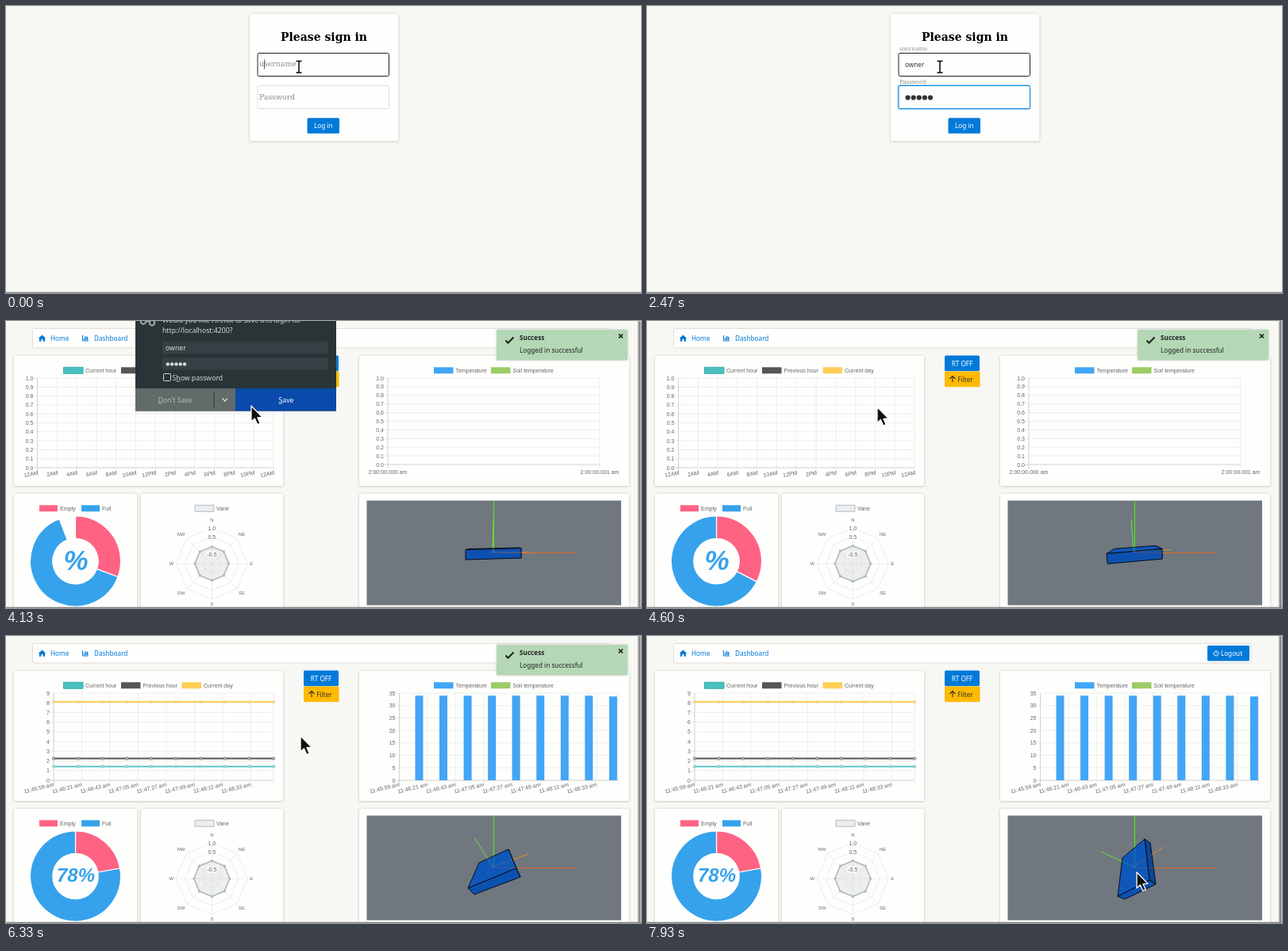
An HTML page with a canvas for the animation above (8000 ms loop, 800 by 362 pixels).

```html
<!DOCTYPE html>
<html lang="en">
<head>
<meta charset="utf-8">
<title>Sensor dashboard</title>
<style>
  html, body { margin: 0; width: 100%; height: 100%; overflow: hidden; background: #f7f7f4; }
  canvas { display: block; }
</style>
</head>
<body>
<canvas id="stage" width="800" height="362"></canvas>
<script>
const LOOP = 8000;
const SANS = '"Noto Sans", "Open Sans", sans-serif';
const SERIF = '"DejaVu Serif", serif';
const ARIAL = '"Liberation Sans", Arial, sans-serif';
const BLUE = '#007ad9', INK = '#333', CHART_BLUE = '#36a2eb', PINK = '#ff6384';
const USER = 'owner';
const ctx = document.getElementById('stage').getContext('2d');

const clamp = v => Math.max(0, Math.min(1, v));
const mix = (a, b, p) => a + (b - a) * p;
const progress = (t, from, to) => clamp((t - from) / (to - from));
const easeOut = p => 1 - (1 - p) ** 4;
const smooth = p => p * p * (3 - 2 * p);

// Interpolates between [time, ...values] keys.
function track(keys, t, ease = p => p) {
  let i = 0;
  while (i < keys.length - 2 && t > keys[i + 1][0]) i++;
  const [a, b] = [keys[i], keys[i + 1]];
  const p = ease(progress(t, a[0], b[0]));
  return a.slice(1).map((v, k) => mix(v, b[k + 1], p));
}

function rect(x, y, w, h, fill, stroke, r = 0) {
  ctx.beginPath();
  ctx.roundRect(x, y, w, h, r);
  if (fill) { ctx.fillStyle = fill; ctx.fill(); }
  if (stroke) { ctx.strokeStyle = stroke; ctx.lineWidth = 1; ctx.stroke(); }
}

function line(x1, y1, x2, y2, color, width = 1) {
  ctx.beginPath();
  ctx.moveTo(x1, y1);
  ctx.lineTo(x2, y2);
  ctx.strokeStyle = color;
  ctx.lineWidth = width;
  ctx.stroke();
}

function poly(points, fill, stroke, width = 1, closed = true) {
  ctx.beginPath();
  points.forEach(([x, y]) => ctx.lineTo(x, y));
  if (closed) ctx.closePath();
  if (fill) { ctx.fillStyle = fill; ctx.fill(); }
  if (stroke) { ctx.strokeStyle = stroke; ctx.lineWidth = width; ctx.stroke(); }
}

function dot(x, y, r, fill) {
  ctx.beginPath();
  ctx.arc(x, y, r, 0, Math.PI * 2);
  ctx.fillStyle = fill;
  ctx.fill();
}

// cy is the middle of the capital letters.
function text(str, x, cy, size, color, font = SANS, align = 'left', style = '') {
  ctx.font = `${style} ${size}px ${font}`;
  ctx.textAlign = align;
  ctx.fillStyle = color;
  ctx.fillText(str, x, cy + size * 0.36);
  return ctx.measureText(str).width;
}

const label = (str, x, cy, align) => text(str, x, cy, 7.02, '#666', ARIAL, align);

function tiltedLabel(str, x, y, angle) {
  ctx.save();
  ctx.translate(x, y);
  ctx.rotate(angle);
  label(str, 0, 0, 'right');
  ctx.restore();
}

function card(x, y, w, h) {
  ctx.save();
  ctx.shadowColor = 'rgba(0,0,0,.25)';
  ctx.shadowBlur = 3;
  ctx.shadowOffsetY = 0.6;
  rect(x, y, w, h, '#fefefd', null, 2);
  ctx.restore();
}

function button(x, y, w, h, str, fill = BLUE, color = '#fff', textX = x + w / 2) {
  rect(x, y, w, h, fill, null, 1.5);
  text(str, textX, y + h / 2 + 0.2, 8.2, color, SANS, 'center');
}

/* ---------- sign-in page ---------- */

function field(y, focus, idle) {
  if (focus > 0) {
    ctx.save();
    ctx.globalAlpha = focus;
    rect(315.5, y - 1.5, 168, 32, '#a6d5fa', null, 3);
    ctx.restore();
  }
  rect(317, y, 165.5, 29, '#fefefd', focus > 0.4 ? '#0a84d8' : idle, 2);
}

function floatingLabel(str, y, p) {
  const q = smooth(p);
  text(str, mix(319, 318, q), mix(y + 13.4, y - 5.6, q), mix(9.36, 7.02, q), '#8b8b88', SERIF);
}

function caret(x, y) {
  line(x + 0.5, y + 8, x + 0.5, y + 20, '#333', 0.8);
}

function drawLogin(t) {
  const userFocus = Math.min(progress(t, 40, 300), 1 - progress(t, 1730, 1930));
  const passFocus = Math.min(progress(t, 1730, 1930), 1 - progress(t, 2460, 2660));
  const typed = [1130, 1200, 1300, 1470, 1535].filter(k => t >= k).length;
  const dots = [1990, 2060, 2130, 2200, 2260].filter(k => t >= k).length;

  card(307, 10, 187.5, 160.5);
  text('Please sign in', 400.5, 39, 14, '#000', SERIF, 'center', 'bold');

  field(59.5, userFocus, '#222');
  floatingLabel('username', 59.3, progress(t, 40, 310));
  const width = text(USER.slice(0, typed), 325, 74, 8.2, INK);
  if (t < 1730) caret(325 + width, 59.5);

  field(100.5, passFocus, '#dededc');
  floatingLabel('Password', 100.8, progress(t, 1730, 1960));
  for (let i = 0; i < dots; i++) dot(328.6 + i * 7.1, 115.5, 3.1, INK);
  if (t >= 1730 && t < 2460) caret(325 + dots * 7.1, 100.5);

  const ring = progress(t, 2460, 2700);
  if (ring) {
    ctx.globalAlpha = ring;
    rect(377.5, 139.5, 44, 23, '#8dcdff', null, 2.5);
    ctx.globalAlpha = 1;
  }
  button(379.5, 141.2, 40.5, 19.6, 'Log in');
}

/* ---------- password prompt ---------- */

function mnemonic(str, x, cy, color, index) {
  text(str, x, cy, 8.7, color);
  const before = ctx.measureText(str.slice(0, index)).width;
  const letter = ctx.measureText(str[index]).width;
  line(x + before, cy + 4.6, x + before + letter, cy + 4.6, color, 0.7);
}

function drawPrompt(t) {
  const light = '#d5dadb';
  rect(163, -5, 253, 118.5, '#293437');
  ctx.strokeStyle = '#a4abad';
  ctx.lineWidth = 2;
  ctx.beginPath();
  ctx.arc(173, 0.5, 3.2, 0, Math.PI * 2);
  ctx.moveTo(176, 0.5);
  ctx.lineTo(181, 0.5);
  ctx.stroke();
  ctx.beginPath();
  ctx.arc(184, 2.3, 3.2, 0, Math.PI * 2);
  ctx.stroke();
  text('Would you like Firefox to save this login for', 197, -1, 8.7, light);
  text('http://localhost:4200?', 197, 11.5, 8.7, light);
  rect(197, 26, 209, 15.5, '#353f44');
  rect(197, 46, 209, 15.5, '#353f44');
  text(USER, 201, 34, 8.7, light);
  for (let i = 0; i < 5; i++) dot(203.8 + i * 5.3, 54.4, 2.2, light);
  rect(198.5, 66.5, 9, 9, null, light, 1);
  mnemonic('Show password', 209.5, 71.5, light, 1);

  rect(163, 85, 126, 28.5, '#636a6a');
  rect(289, 85, 127, 28.5, t < 3850 ? '#0060df' : '#0a4aaa');
  line(262, 90, 262, 109, '#2d3638');
  mnemonic("Don't Save", 191.5, 99.5, '#b7bcbc', 0);
  mnemonic('Save', 343.5, 99.5, '#fff', 0);
  poly([[272.5, 97.5], [275.8, 101], [279, 97.5]], null, '#d5dadb', 1.2, false);
}

/* ---------- dashboard ---------- */

function legend(x, cy, str, fill, stroke, width = 24.5) {
  rect(x, cy - 4, width, 8, fill, stroke);
  label(str, x + width + 3, cy);
}

function yAxis(x, right, top, bottom, names) {
  names.forEach((name, i) => {
    const y = mix(bottom, top, i / (names.length - 1));
    line(x - 5, y, right, y, i ? '#e7e7e6' : '#bdbdbd', 0.7);
    label(name, x - 5, y, 'right');
  });
}

function xGrid(x, top, bottom, first) {
  line(x, top, x, bottom + 5, first ? '#bdbdbd' : '#e7e7e6', 0.7);
}

function timeAxis(x0, bottom) {
  for (let i = 0; i < 8; i++) {
    const x = x0 + i * 35.5;
    const s = 59 + i * 22;
    const stamp = `11:${45 + Math.floor(s / 60)}:${String(s % 60).padStart(2, '0')} am`;
    xGrid(x, 72, bottom, i === 0);
    tiltedLabel(stamp, x, bottom + 5, -0.235);
  }
}

const tenths = Array.from({ length: 11 }, (_, i) => (i / 10).toFixed(1));
const hours = Array.from({ length: 13 }, (_, i) => `${(i * 2) % 12 || 12}${i > 5 && i < 12 ? 'PM' : 'AM'}`);

function drawLineChart(loaded, p) {
  card(10, 44, 339, 164);
  legend(72.5, 62.3, 'Current hour', '#4bc0c0', '#3fa9a9');
  legend(145, 62.3, 'Previous hour', '#565656');
  legend(221.5, 62.3, 'Current day', '#ffce56');
  if (!loaded) {
    yAxis(39.5, 337, 72, 185, tenths);
    hours.forEach((h, i) => {
      const x = 39.5 + i * 24.8;
      xGrid(x, 72, 185, i === 0);
      tiltedLabel(h, x + 1, 191, -0.2);
    });
    return;
  }
  yAxis(60, 337, 72, 182, [...'0123456789']);
  timeAxis(60, 182);
  xGrid(337, 72, 182);
  for (const [value, color] of [[8.1, '#ffce56'], [2.25, '#565656'], [1.42, '#4bc0c0']]) {
    const y = 182 - value * p * 110 / 9;
    line(60, y, 337, y, color, 1.9);
    for (let i = 0; i < 10; i++) {
      ctx.beginPath();
      ctx.arc(60 + i * 30.8, y, 1.6, 0, Math.PI * 2);
      ctx.fillStyle = '#d9d9d6';
      ctx.fill();
      ctx.strokeStyle = color;
      ctx.lineWidth = 0.8;
      ctx.stroke();
    }
  }
}

function drawBarChart(loaded, p) {
  card(445, 44, 340, 164);
  legend(539, 62.3, 'Temperature', '#42a5f5');
  legend(611, 62.3, 'Soil temperature', '#9ccc65');
  if (!loaded) {
    yAxis(481, 748, 72, 181, tenths);
    [481, 748].forEach((x, i) => {
      xGrid(x, 72, 181, i === 0);
      label(`2:00:00.00${i} am`, x, 190.5, 'center');
    });
    return;
  }
  yAxis(495.5, 771, 72, 182, ['0', '5', '10', '15', '20', '25', '30', '35']);
  timeAxis(495.5, 182);
  xGrid(771, 72, 182);
  for (let i = 0; i < 9; i++) {
    const h = (i === 8 ? 105.8 : 106.8) * p;
    rect(515.5 + i * 30.55, 182 - h, 10, h, '#42a5f5');
  }
}

function slice(from, to, color) {
  const a = from * Math.PI * 2 - Math.PI / 2;
  const b = to * Math.PI * 2 - Math.PI / 2;
  ctx.beginPath();
  ctx.arc(87.5, 303, 57, a, b);
  ctx.arc(87.5, 303, 28.7, b, a, true);
  ctx.closePath();
  ctx.fillStyle = color;
  ctx.fill();
  ctx.strokeStyle = '#fff';
  ctx.lineWidth = 1.2;
  ctx.stroke();
}

function drawDonut(intro, loaded, p) {
  card(10, 218, 155, 200);
  legend(42, 236.3, 'Empty', PINK, null, 23);
  legend(95, 236.3, 'Full', CHART_BLUE, null, 23);
  const empty = mix(0.325, 0.222, p) * intro;
  slice(0, empty, PINK);
  slice(empty, intro, CHART_BLUE);
  text(loaded ? '78%' : '%', 88, 301.5, loaded ? 24 : 35, CHART_BLUE, ARIAL, 'center', 'italic bold');
}

const octagon = r => Array.from({ length: 8 }, (_, i) => {
  const a = i * Math.PI / 4;
  return [259.3 + r * Math.sin(a), 306 - r * Math.cos(a)];
});

function drawRadar(intro) {
  card(170, 218, 179, 200);
  legend(238, 236.3, 'Vane', '#ebedee', '#b4bcc4', 24);
  for (let i = 1; i < 5; i++) poly(octagon(i * 11.25), null, '#e4e4e3', 0.7);
  octagon(45).forEach(([x, y]) => line(259.3, 306, x, y, '#e4e4e3', 0.7));
  const vane = octagon(22.5 * intro);
  poly(vane, 'rgba(210,214,217,.4)', '#b4bcc4', 1.7);
  vane.forEach(([x, y]) => dot(x, y, 1.5, '#abb4bc'));
  const names = ['N', 'NE', 'E', 'SE', 'S', 'SW', 'W', 'NW'];
  octagon(52).forEach(([x, y], i) => {
    const shift = [0, 1, -2, 1, 0, -2, 1, -2][i];
    text(names[i], x + shift, mix(306, y, i % 4 ? 1 : 1.06) - (i === 4 ? 4 : 0), 6, '#666', ARIAL, 'center');
  });
  [['1.0', 261], ['0.5', 272], ['-0.5', 294.5]].forEach(([name, y]) => {
    rect(252, y - 4, 14.5, 8, 'rgba(255,255,255,.6)');
    label(name, 259.3, y, 'center');
  });
}

// Corner order: near top left/right, far top right/left, near bottom left/right, far bottom right.
const boxKeys = [
  [4130, 579, 288.5, 649, 286.5, 645, 286, 583, 287.5, 579, 301, 649, 299, 645, 297],
  [5400, 579, 302, 649, 289, 633, 279, 598, 287, 582, 315, 649, 302, 641, 291],
  [6330, 582, 318, 643, 293, 633, 269, 596, 286, 590, 326, 648, 304, 639, 283],
  [7930, 593, 328.5, 633, 308, 627, 256, 599, 280, 602, 332, 641, 313, 634, 261]
];
const axisKeys = [
  [4130, 614, 250, 660, 292],
  [5400, 603, 250, 660, 283],
  [6330, 590, 254, 658, 275],
  [7930, 572, 272, 651, 266]
];

function drawAxes(t) {
  const [gx, gy, rx, ry] = track(axisKeys, t);
  line(614.5, 227, 614.5, 292, '#4fe01c', 1.2);
  line(614, 292.5, 717, 292.5, '#e06a2c', 1);
  line(613, 291, gx, gy, '#6fd83a', 1);
  line(613, 291, rx, ry, '#d88a2c', 1);
}

function drawScene(t) {
  card(445, 218, 340, 200);
  rect(454.5, 226.5, 320.5, 132, '#70777f');
  const v = track(boxKeys, t);
  const corners = Array.from({ length: 7 }, (_, i) => [v[i * 2], v[i * 2 + 1]]);
  const [a, b, c, d, e, f, g] = corners;
  drawAxes(t);
  ctx.lineJoin = 'round';
  poly([b, c, g, f], '#0c469a', '#080d18');
  poly([a, b, c, d], '#1057ba', '#080d18');
  poly([a, b, f, e], '#0d51b0', '#080d18');
  ctx.globalAlpha = 0.25;
  drawAxes(t);
  ctx.globalAlpha = 1;
  dot(613, 291.5, 1, '#2d62ff');
}

function drawNav() {
  rect(33.5, 9.5, 727.5, 24.5, '#fefefd', '#dededb', 2);
  poly([[40.8, 22], [45.5, 17.5], [50.2, 22], [49, 22], [49, 25.8], [46.6, 25.8],
    [46.6, 23], [44.4, 23], [44.4, 25.8], [42, 25.8], [42, 22]], BLUE);
  text('Home', 56, 21.7, 8.2, BLUE);
  poly([[96.5, 18], [96.5, 25], [104, 25]], null, BLUE, 1, false);
  [3, 5, 4].forEach((h, i) => rect(98 + i * 2, 24 - h, 1.3, h, BLUE));
  text('Dashboard', 111, 21.7, 8.2, BLUE);
  button(706, 12, 53, 19.5, 'Logout', BLUE, '#fff', 736.5);
  ctx.beginPath();
  ctx.arc(717, 22, 3, -1, Math.PI + 1);
  ctx.strokeStyle = '#fff';
  ctx.lineWidth = 1;
  ctx.stroke();
  line(717, 18, 717, 22, '#fff');
}

function drawToast(t) {
  const leave = progress(t, 6830, 7100) ** 2;
  const alpha = Math.min(progress(t, 3760, 4000), 1 - leave);
  if (alpha <= 0) return;
  ctx.save();
  ctx.globalAlpha = alpha;
  ctx.translate(0, -leave * 20);
  ctx.shadowColor = 'rgba(0,0,0,.2)';
  ctx.shadowBlur = 3;
  rect(618, 11, 165, 38.5, '#b4d8b5', null, 1);
  ctx.shadowColor = 'transparent';
  poly([[629.5, 24.5], [632.5, 27.7], [639.5, 20.5]], null, '#222', 2, false);
  text('Success', 647, 21.3, 8.2, '#222', SANS, 'left', 'bold');
  text('Logged in successful', 647, 37.2, 8.2, '#222');
  line(772, 16.5, 777, 21.5, '#222', 1.7);
  line(777, 16.5, 772, 21.5, '#222', 1.7);
  ctx.restore();
}

function drawDashboard(t) {
  const intro = easeOut(progress(t, 3800, 4450));
  const loaded = t >= 4640;
  const p = easeOut(progress(t, 4640, 5440));
  drawNav();
  drawLineChart(loaded, p);
  button(375, 43.5, 44, 19.7, 'RT OFF');
  button(375, 63.5, 44.5, 19.7, 'Filter', '#ffba01', INK, 401);
  line(385, 69.5, 385, 77, INK, 1.1);
  poly([[381.5, 73], [385, 69.5], [388.5, 73]], null, INK, 1.1, false);
  drawBarChart(loaded, p);
  drawDonut(intro, loaded, p);
  drawRadar(intro);
  drawScene(t);
  drawToast(t);
  rect(795, 0, 5, 362, '#e6e6e4');
  rect(796.5, 0, 3, 362, '#8b8b8b', null, 1.5);
}

/* ---------- pointer ---------- */

const pointerKeys = [
  [3800, 366.5, 73], [4130, 309, 107], [4500, 290, 108.5], [5400, 290, 108.5],
  [5470, 321, 117], [5900, 371, 126], [6500, 371, 126], [7200, 502, 221], [7800, 617, 298]
];

function drawArrow(t) {
  const [x, y] = track(pointerKeys, t);
  const shape = [[0, 0], [0, 20], [4.4, 16], [7.8, 23.5], [11.2, 22], [7.9, 14.8], [14, 14.4]];
  ctx.lineJoin = 'round';
  poly(shape.map(([dx, dy]) => [x + dx, y + dy]), '#111', '#fff', 1.3);
}

function drawBeam() {
  for (const [color, width] of [['#fff', 3.4], ['#111', 1.6]]) {
    line(369, 69.5, 369, 84, color, width);
    line(365.5, 69.5, 372.5, 69.5, color, width);
    line(365.5, 84, 372.5, 84, color, width);
  }
}

function draw(t) {
  ctx.fillStyle = '#f7f7f4';
  ctx.fillRect(0, 0, 800, 362);
  if (t < 3800) drawLogin(t);
  else drawDashboard(t);
  if (t >= 3070 && t < 4270) {
    ctx.globalAlpha = t < 3130 ? 0.6 : 1;
    drawPrompt(t);
    ctx.globalAlpha = 1;
  }
  rect(0, 360.7, 800, 1.3, '#858585');
  if (t < 3070) drawBeam();
  else drawArrow(t);
}

const start = performance.now();
function frame() {
  draw((performance.now() - start) % LOOP);
  requestAnimationFrame(frame);
}
frame();
</script>
</body>
</html>
```
